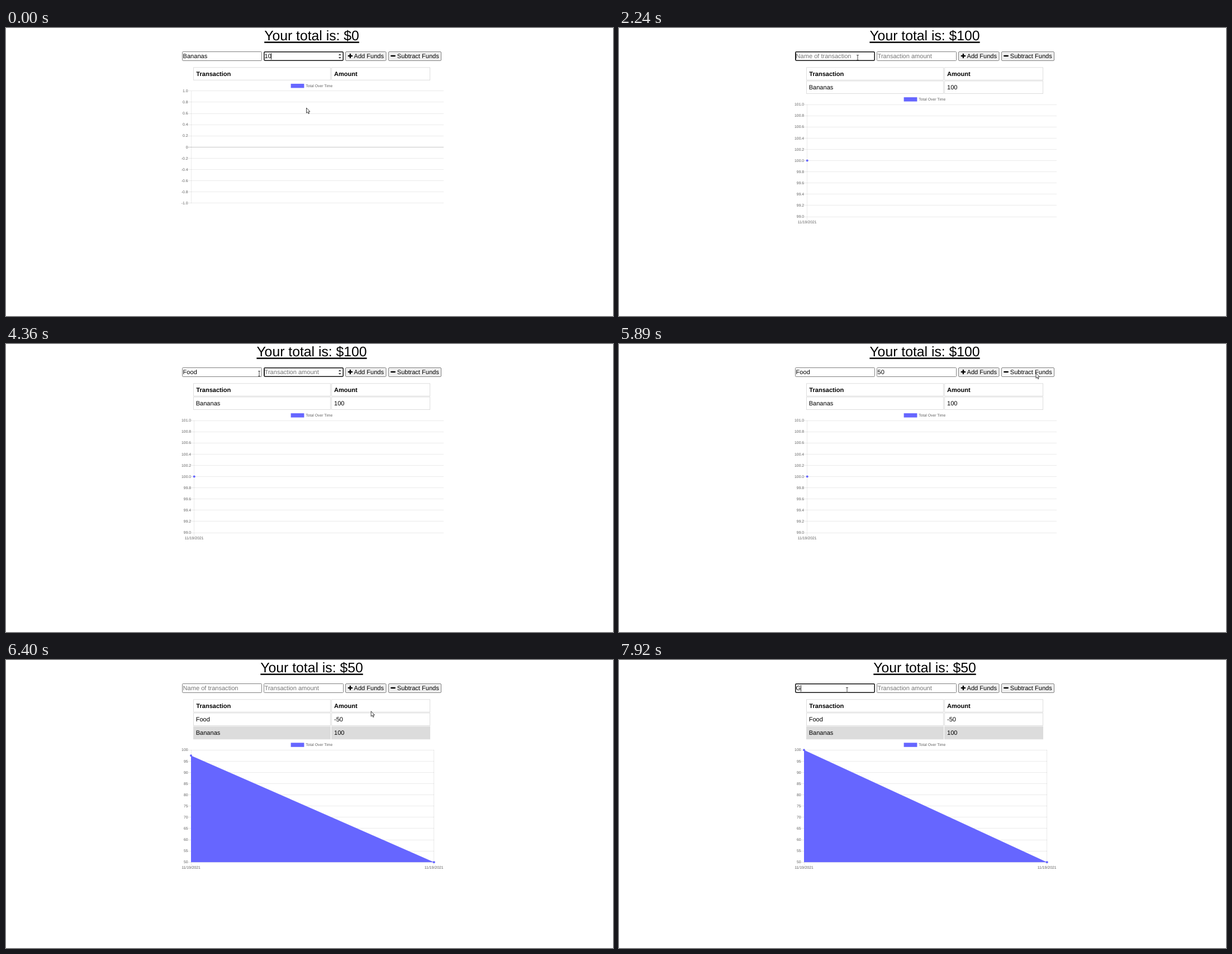
These frames come from a looping animation (1086x516 px, 8 s). An HTML page:

```html
<!DOCTYPE html>
<html lang="en">
<head>
<meta charset="utf-8">
<title>Budget tracker</title>
<style>
html, body { margin: 0; width: 100%; height: 100%; overflow: hidden; background: #fff; }
svg { display: block; width: 1086px; height: 516px; }
text { font: 11.05px Arial, "Liberation Sans", sans-serif; text-rendering: geometricPrecision; white-space: pre; }
.title { font-size: 24.75px; text-decoration: underline; text-anchor: middle; }
.head { font-weight: bold; }
.hint { fill: #757575; }
.small { font-size: 6.85px; fill: #606060; }
.end { text-anchor: end; }
.mid { text-anchor: middle; }
.grid { stroke: #000; stroke-opacity: .08; shape-rendering: crispEdges; }
.zero { stroke-opacity: .22; }
</style>
</head>
<body>
<svg id="stage" viewBox="0 0 1086 516"></svg>
<script>
const LOOP = 8000, KEY_GAP = 124, BLINK = 530, BLUE = '#6666ff';
const stage = document.getElementById('stage');
const ruler = document.createElement('canvas').getContext('2d');
ruler.font = '11.05px Arial, "Liberation Sans", sans-serif';

// Each transaction: when its fields get focus and keys, when its button is pressed and its result appears
const entries = [
  { name: 'Bananas', amount: 100, focusName: -3000, nameAt: -2500, focusAmount: -500, amountAt: -KEY_GAP, press: 1160, post: 1280, grow: 1231 },
  { name: 'Food', amount: -50, focusName: 2000, nameAt: 3600, focusAmount: 4360, amountAt: 4890, press: 5890, post: 6040, grow: 5873 },
  { name: 'G', amount: 0, focusName: 7000, nameAt: 7920, focusAmount: LOOP, amountAt: LOOP, press: LOOP, post: LOOP }
];
const CLEAR_DELAY = 120;

const home = [537.5, 143];
const moves = [
  { from: 440, until: 1040, to: [648.5, 50] },
  { from: 1400, until: 2000, to: [427, 53.2] },
  { from: 4110, until: 4360, to: [453, 53.2] },
  { from: 5260, until: 5770, to: [746, 52], via: [1000, 15] },
  { from: 6040, until: 6760, to: [593.5, 238], via: [637, 38] },
  { from: 6760, until: 7000, to: [408, 54] }
];

const text = (x, y, value, cls = '') => `<text x="${x}" y="${y}" class="${cls}">${value}</text>`;
const rect = (x, y, w, h, attrs) => `<rect x="${x}" y="${y}" width="${w}" height="${h}" ${attrs}/>`;
const path = (d, attrs = '') => `<path d="${d}" ${attrs}/>`;
const crisp = v => Math.floor(v) + .5;
const clamp = p => Math.min(1, Math.max(0, p));
const easeOutQuart = p => 1 - (1 - clamp(p)) ** 4;
const typed = (word, start, t) => word.slice(0, Math.max(0, 1 + Math.floor((t - start) / KEY_GAP)));

function pointerAt(t) {
  return moves.reduce((start, { from, until, to, via }) => {
    const p = clamp((t - from) / (until - from)), q = 1 - p;
    return start.map((a, i) => {
      const bend = via ? via[i] : (a + to[i]) / 2;
      return q * q * a + 2 * p * q * bend + p * p * to[i];
    });
  }, home);
}

// The caret is solid after focus or a key, then blinks
function caretOn(t, focusAt, word, keysAt) {
  const keys = [...word].map((_, i) => keysAt + i * KEY_GAP);
  const last = Math.max(...[focusAt, ...keys].filter(time => time <= t));
  return Math.floor((t - last) / BLINK) % 2 === 0;
}

function field(x, value, hint, focused, caret, spinner) {
  let out = focused
    ? rect(x + .8, 42.8, 141.4, 15.4, 'rx="1.4" fill="#fff" stroke="#101010" stroke-width="1.5"')
    : rect(x + .5, 42.5, 142, 16, 'rx="1" fill="#fff" stroke="#808080"');
  const tx = x + 1.6;
  out += text(tx, 54, value || hint, value ? '' : 'hint');
  if (focused && caret) {
    out += rect(Math.floor(tx + ruler.measureText(value).width), 45, 1, 11.5, 'fill="#222"');
  }
  if (focused && spinner) out += path(`M${x + 133.8} 49h5l-2.5-3zM${x + 133.8} 52h5l-2.5 3z`, 'fill="#444"');
  return out;
}

function button(x, w, label, labelX, icon, [px, py], down) {
  const hover = py > 42 && py < 59 && px > x && px < x + w;
  const fill = down ? '#f8f8f8' : hover ? '#e5e5e5' : '#efefef';
  return rect(x + .5, 42.5, w - 1, 16, `rx="1.5" fill="${fill}" stroke="#808080"`)
    + path(icon, 'stroke="#000" stroke-width="2.4" stroke-linecap="round"') + text(labelX, 54, label);
}

function tableRow(y, cells, head, shaded) {
  const attrs = `fill="${shaded ? '#dcdcdc' : '#fff'}" stroke="#ddd"`;
  const cls = head ? 'head' : '';
  return rect(335.5, y, 245, 22.5, attrs) + rect(582.5, y, 176, 22.5, attrs)
    + text(head ? 340.3 : 339.7, y + 15.2, cells[0], cls) + text(587, y + 15.2, cells[1], cls);
}

function chart(balances, growth) {
  const count = balances.length;
  const spread = count > 1 ? 0 : 1;
  const values = count ? balances : [0];
  const max = Math.max(...values) + spread, min = Math.min(...values) - spread;
  const step = (max - min) / 10, gap = 20.1;
  const left = count === 1 ? 336.7 : 331, right = count > 1 ? 765.7 : 783;
  const top = 112.8 + 24.2 * count, bottom = top + 10 * gap;

  let out = rect(509.6, top - 12.9, 23.8, 7.5, `fill="${BLUE}"`) + text(536.3, top - 7, 'Total Over Time', 'small');
  for (let i = 0; i <= 10; i++) {
    const y = top + i * gap, value = max - i * step;
    const zero = Math.abs(value) < 1e-6;
    out += path(`M${left - 5.7} ${crisp(y)}H${right}`, `class="grid ${zero ? 'zero' : ''}"`)
      + text(left - 5.5, y + 2.2, zero ? '0' : value.toFixed(spread), 'small end');
  }
  const axis = x => path(`M${crisp(x)} ${top}V${bottom + (count && 5.7)}`, 'class="grid"');
  out += axis(left);

  const dots = balances.map((value, i) =>
    [left + i * (right - left), bottom - (value - min) / step * gap * growth]);
  if (count > 1) {
    out += axis(right) + path(`M${left} ${bottom}L${dots.join('L')}V${bottom}z`, `fill="${BLUE}"`);
  }
  dots.forEach(([x, y]) => {
    out += `<circle cx="${x}" cy="${y}" r="2" fill="${BLUE}"/>` + text(x, bottom + 11.7, '11/19/2021', 'small mid');
  });
  return out;
}

function drawPointer([x, y]) {
  const overField = y > 42 && y < 59 && (x > 315 && x < 458 || x > 461 && x < 604);
  return overField
    ? path(`M${x - 2} ${y - 4.5}h4M${x} ${y - 4.5}v9M${x - 2} ${y + 4.5}h4`, 'fill="none" stroke="#333" stroke-width=".9"')
    : path(`M${x} ${y}v9.3l2.1-1.9l1.5 3.3l1.4-.6l-1.4-3.2h2.8z`, 'fill="#fff" stroke="#111" stroke-width=".8"');
}

function draw(t) {
  const posted = entries.filter(e => e.post <= t);
  let total = 0;
  const balances = posted.map(e => total += e.amount);
  const growth = posted.length ? easeOutQuart((t - posted[posted.length - 1].grow) / 1000) : 0;

  const entry = entries.find(e => t < e.post + CLEAR_DELAY);
  const digits = String(Math.abs(entry.amount));
  const onAmount = t >= entry.focusAmount && t < entry.press;
  const onName = t >= entry.focusName && t < entry.focusAmount;
  const nameCaret = onName && caretOn(t, entry.focusName, entry.name, entry.nameAt);
  const amountCaret = onAmount && caretOn(t, entry.focusAmount, digits, entry.amountAt);
  const pressing = t >= entry.press && t < entry.post;
  const pointer = pointerAt(t);

  stage.innerHTML = text(547, 22.4, `Your total is: $${total}`, 'title')
    + field(315, typed(entry.name, entry.nameAt, t), 'Name of transaction', onName, nameCaret)
    + field(461, typed(digits, entry.amountAt, t), 'Transaction amount', onAmount, amountCaret, true)
    + button(607, 73.5, 'Add Funds', 622.6, 'M612.8 50h6.2M615.9 46.9v6.2', pointer, pressing && entry.amount > 0)
    + button(684, 95, 'Subtract Funds', 699.8, 'M689.3 50h6.4', pointer, pressing && entry.amount < 0)
    + tableRow(70.8, ['Transaction', 'Amount'], true)
    + [...posted].reverse().map((e, i) => tableRow(95 + 24.2 * i, [e.name, e.amount], false, i % 2)).join('')
    + chart(balances, growth) + drawPointer(pointer);
}

const begin = performance.now();
function tick() {
  draw((performance.now() - begin) % LOOP);
  requestAnimationFrame(tick);
}
tick();
</script>
</body>
</html>
```
